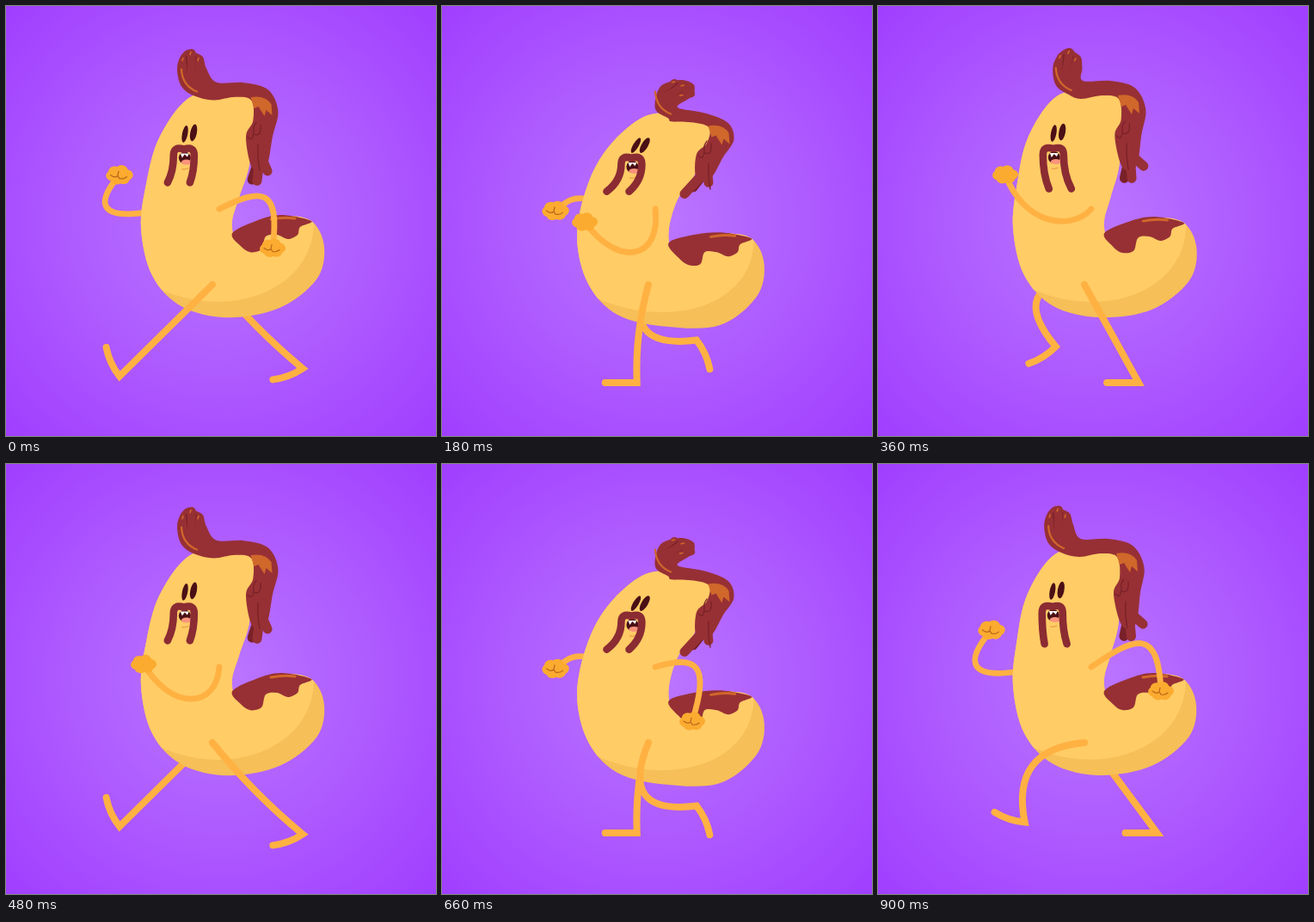
Animation, 500 px wide and 500 px high, one loop 960 ms. Source, as an HTML page with a canvas:

```html
<!DOCTYPE html>
<html lang="en">
<head>
<meta charset="utf-8">
<title>Strutting snack</title>
<style>
html, body { margin: 0; width: 100%; height: 100%; overflow: hidden; background: #a548ff; }
canvas { display: block; }
</style>
</head>
<body>
<canvas id="stage" width="500" height="500"></canvas>
<script>
const ctx = document.getElementById('stage').getContext('2d');
const STEP = 60, STEPS = 16, STRIDE = STEPS / 2;
const SKIN = '#ffcc66', SHADE = '#f6bf57', LIMB = '#ffb142', FIST = '#fbab2f', CREASE = '#b9681c';
const CHOC = '#973034', CHOC_DARK = '#792129', MUSTACHE = '#8b2b32', GLOSS = '#d0672b', INK = '#4a1015';

// Outlines of the upright pose; warp() squashes them.
const BODY = [
  [157, 258], [163, 205], [177, 153], [208, 108], [245, 97], [287, 108], [283, 180], [271, 222],
  [263, 250], [268, 270], [290, 251], [320, 244], [355, 250], [370, 280], [361, 318],
  [318, 351], [258, 362], [204, 349], [170, 313]
];
const HAIR = [
  [215, 103], [200, 92], [195, 72], [199, 57], [208, 49], [217, 53], [225, 58], [229, 71],
  [243, 87], [275, 87], [303, 95], [315, 120], [309, 150], [302, 186], [286, 188], [278, 151],
  [286, 132], [284, 108], [265, 104], [240, 108]
];
const TAIL_CHOC = [
  [263, 264], [273, 279], [284, 286], [297, 283], [302, 268], [315, 266],
  [328, 271], [339, 266], [342, 257], [355, 250], [320, 243], [290, 250]
];
// Near arm from front to back: two curve handles and the hand.
const ARM_POSES = [
  [225, 262, 170, 255, 148, 196],
  [255, 295, 205, 305, 166, 251],
  [296, 222, 312, 232, 291, 299],
  [300, 200, 326, 190, 329, 264]
];

const backdrop = ctx.createRadialGradient(250, 250, 0, 250, 250, 355);
backdrop.addColorStop(0, '#bb77ff');
backdrop.addColorStop(1, '#a03eff');

const clamp = v => Math.max(0, Math.min(1, v));
const mix = (a, b, k) => a + (b - a) * k;
const wave = (step, peak, period) => Math.cos(2 * Math.PI * (step - peak) / period);

let mood;

// The body bobs twice per cycle; tail, tuft and locks lag behind the bend.
function bob(step) {
  const swing = peak => wave(step, peak, STRIDE);
  const pulse = peak => ((1 + swing(peak)) / 2) ** 2;
  const bend = .38 + .62 * swing(2.7);
  return {
    bend,
    squash: Math.max(0, bend),
    belly: clamp(.5 + 2 * swing(2.3)),
    tail: pulse(3.5),
    curl: 1.2 * pulse(3.7),
    lean: 23 + 25 * swing(3.1),
    sway: pulse(6.5) ** 2,
    whisker: -19 - 14 * swing(2),
    droop: 40 - 6 * swing(1.5)
  };
}

function warp([x, y]) {
  const { bend, squash, belly, tail } = mood;
  const high = Math.max(0, (235 - y) / 130), low = clamp((y - 230) / 10), back = clamp((x - 255) / 60);
  return [
    x + 28 * high * bend + 5 * low * back * tail,
    y + high * squash * (22 + .18 * (x - 210)) + low * mix(10 * belly, 22 * tail, back)
  ];
}

function hairWarp([x, y]) {
  if (x > 235) return warp([x, y]);
  const turn = .9 * mood.curl * clamp((92 - y) / 40), c = Math.cos(turn), s = Math.sin(turn);
  const dx = x - 212, dy = y - 92;
  return [212 + dx * c - dy * s + mood.lean, 92 + dx * s + dy * c + 28 * mood.squash];
}

// Closed smooth curve through points
function blob(pts) {
  const n = pts.length, at = i => pts[(i + n) % n], path = new Path2D();
  path.moveTo(...pts[0]);
  for (let i = 0; i < n; i++) {
    const [p, a, b, q] = [at(i - 1), at(i), at(i + 1), at(i + 2)];
    path.bezierCurveTo(a[0] + (b[0] - p[0]) / 6, a[1] + (b[1] - p[1]) / 6,
      b[0] - (q[0] - a[0]) / 6, b[1] - (q[1] - a[1]) / 6, ...b);
  }
  return path;
}

function fill(path, color) {
  ctx.fillStyle = color;
  ctx.fill(typeof path === 'string' ? new Path2D(path) : path);
}

function stroke(d, color, width) {
  ctx.strokeStyle = color;
  ctx.lineWidth = width;
  ctx.stroke(new Path2D(d));
}

function oval(x, y, rx, ry, color, angle = 0) {
  const path = new Path2D();
  path.ellipse(x, y, rx, ry, angle, 0, 7);
  fill(path, color);
}

function shifted(x, y, draw) {
  ctx.save();
  ctx.translate(x, y);
  draw();
  ctx.restore();
}

// Draws details that ride along with the body at a point.
function riding(x, y, draw) {
  const [wx, wy] = warp([x, y]);
  shifted(wx - x, wy - y, draw);
}

// Foot planted and sliding back for half the cycle, then lifted and swung forward.
function leg(step, dy) {
  const phase = step % STEPS || STEPS, swinging = phase >= STRIDE;
  const u = phase / STRIDE - swinging;
  const x = swinging ? mix(345, 132, u ** 1.5) : mix(132, 345, u) + 16 * Math.sin(Math.PI * u);
  const y = 438 - 43 * Math.max(0, Math.sin(Math.PI * (phase - 7.5) / 9));
  const pitch = swinging ? 2 * Math.cos(Math.PI * (u - .39) / .88) : 0;
  const tx = x - 37 * Math.cos(pitch), ty = y + 37 * Math.sin(pitch);
  const arch = swinging ? .12 : 0;
  const mx = (x + tx) / 2 + (ty - y) * arch, my = (y + ty) / 2 - (tx - x) * arch;

  // A shorter reach bows the knee outward.
  const hx = 240, hy = 324, dx = x - hx, rise = y - hy, reach = Math.hypot(dx, rise);
  const bow = swinging ? .45 * Math.sqrt(Math.max(0, 150 ** 2 - reach ** 2)) : Math.max(0, 24 - 48 * u);
  const handle = k => `${hx + dx * k - rise / reach * bow} ${hy + rise * k + dx / reach * bow}`;
  shifted(0, dy, () => stroke(
    `M${hx} ${hy}C${handle(1 / 3)} ${handle(2 / 3)} ${x} ${y}Q${mx} ${my} ${tx} ${ty}`, LIMB, 8));
}

function fist(x, y, size, creased) {
  shifted(x, y, () => {
    ctx.scale(size, size);
    for (let a = 0; a < 6; a++) oval(8 * Math.cos(a), 5 * Math.sin(a), 7, 6, FIST);
    if (creased) stroke('M-10 0Q-5 4-2 1L0 4M-2 1L-1-4M0 4Q5 5 8 2', CREASE, 1.2);
  });
}

function nearArm(step) {
  const d = Math.min(Math.abs(step - 6), STEPS - Math.abs(step - 6));
  const u = Math.min(3, d < 3 ? d / 3 : (d - 1) / 2), i = Math.min(2, Math.floor(u));
  const [ax, ay, bx, by, x, y] = ARM_POSES[i].map((v, n) => mix(v, ARM_POSES[i + 1][n], u - i));
  stroke(`M248 236C${ax} ${ay} ${bx} ${by} ${x} ${y}`, LIMB, 6.8);
  fist(x, y, 1, x > 200);
}

function farArm(step) {
  const q = wave(step, 15, STEPS), x = 132 + 60 * Math.max(0, -q), y = 238 - 45 * Math.max(0, q);
  stroke(`M170 ${225 + 15 * q}C${150 - 45 * q} ${220 + 32 * q} ${142 - 42 * q} 230 ${x} ${y}`, LIMB, 6.8);
  fist(x, y, 1.05, true);
}

function drawBody() {
  const path = blob(BODY.map(warp));
  fill(path, SHADE);
  ctx.save();
  ctx.clip(path);
  const [a, b, c, d] = [[165, 322], [250, 370], [360, 335], [358, 248]].map(warp);
  fill(`M100 0L${a}C${b} ${c} ${d}L500 0Z`, SKIN);
  ctx.restore();
  fill(blob(TAIL_CHOC.map(warp)), CHOC);
  riding(322, 247, () => stroke('M308 248Q323 245 336 247', GLOSS, 3));
}

function drawHair() {
  const { squash, sway, curl, lean } = mood;
  const lock = (x, y, dx, dy, color) =>
    stroke(`M${warp([295, 172])}L${warp([x + dx * sway, y + dy * sway])}`, color, 11);
  lock(285, 202, 3, -2, CHOC_DARK);
  lock(301, 193, 11, -8, CHOC);
  lock(291 - 14 * squash, 203 + 10 * squash, 6, -3, CHOC);
  fill(blob(HAIR.map(hairWarp)), CHOC);

  shifted(lean, 28 * squash, () => {
    stroke('M200 72Q201 91 218 98', GLOSS, 2.2);
    ctx.translate(211, 78);
    ctx.rotate(curl);
    for (const i of [-1, 1, 0]) {
      const x = 9 * i + 1, y = 7 * Math.abs(i) - 25;
      stroke(`M${3 * i} 0L${x} ${y}`, CHOC, 9);
      stroke(`M${x - 2} ${y + 2}L${x - 1} ${y - 1}`, GLOSS, 1.6);
      if (i) stroke(`M${4 * i} -3Q${4 * i} -12 ${5.5 * i} -21`, CHOC_DARK, 1.4);
    }
  });
  riding(296, 110, () => fill(
    'M283 104Q300 101 307 112L308 125L301 119L299 126L292 115L287 117Z', GLOSS));
  riding(287, 150, () => stroke(
    'M280 151Q287 158 287 143Q286 139 290 134M288 148Q296 151 295 137M292 160Q291 175 294 190',
    CHOC_DARK, 1.3));
}

function drawFace() {
  const { squash, whisker, droop } = mood;
  for (const [x, y, r] of [[207, 148, 3.2], [217, 146.5, 3.8]])
    oval(...warp([x, y]), r, 10, INK, .18 + .36 * squash);

  const [x, y] = warp([206, 167]);
  shifted(x, y, () => {
    oval(1, 9, 7, 7, INK);
    oval(3, 14, 6, 3, '#f9937c');
    fill('M-4 4L-2 9L1 5L4 8L6 4Z', '#fff');
    stroke('M-2 22Q2 23 5 21', '#e59a45', 1.2);
    const side = (top, end) =>
      stroke(`M0-1Q${top}-5 ${top} 6Q${top} ${droop / 2 + 6} ${end} ${droop}`, MUSTACHE, 8.6);
    side(-12, whisker);
    side(12, whisker + 26);
  });
}

function draw() {
  const step = Math.floor(performance.now() / STEP) % STEPS;
  mood = bob(step);
  ctx.fillStyle = backdrop;
  ctx.fillRect(0, 0, 500, 500);
  ctx.lineCap = 'round';
  farArm(step);
  leg(step + STRIDE, -9);
  drawBody();
  drawHair();
  drawFace();
  leg(step, 0);
  nearArm(step);
  requestAnimationFrame(draw);
}
draw();
</script>
</body>
</html>
```
